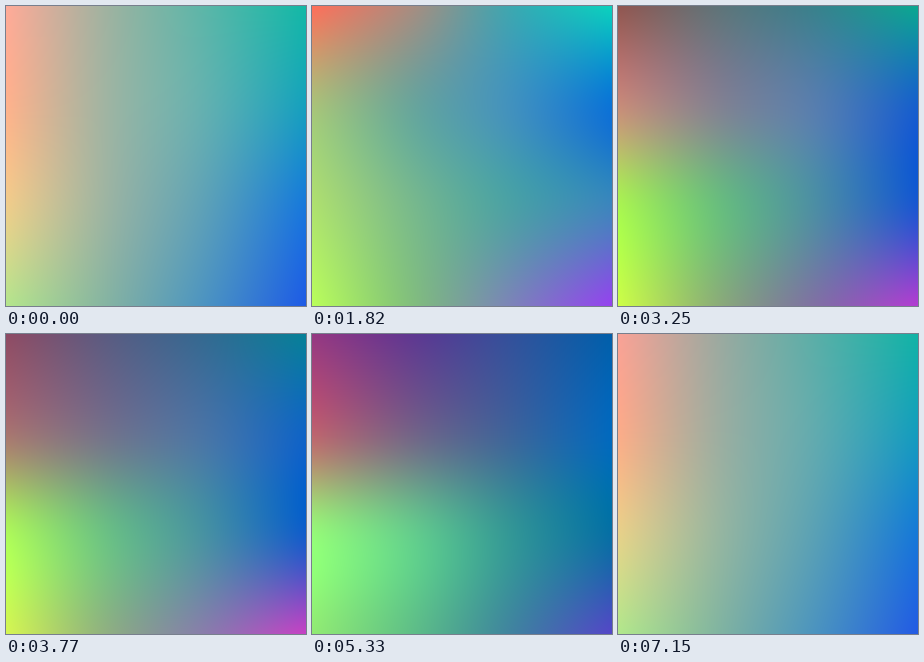
Animation, 300 px wide and 300 px high, one loop 7280 ms. Source, as an HTML page with a canvas:

```html
<!DOCTYPE html>
<html lang="en">
<head>
<meta charset="utf-8">
<title>Drifting colour mesh</title>
<style>
  html, body { margin: 0; width: 100%; height: 100%; overflow: hidden; }
  canvas { display: block; width: 100vw; height: 100vh; }
</style>
</head>
<body>
<canvas id="stage" width="300" height="300"></canvas>
<script>
const SIZE = 300, LOOP = 7280, STEP = 130;

// Each pose is a 4 x 4 mesh of colours spread evenly over the stage.
const poses = [
  { at: 0, mesh: [
    'ffaa98 a0b2a0 5ab6a8 12b9a6',
    'ffb28c a0b4a2 62b0b0 14a0be',
    'f0cd8a 9cb4a2 5ca0b8 1678dc',
    'b4e68c 84b4a2 4b92c2 1e5ae6'] },
  { at: 1820, mesh: [
    'ff6e5a a88c80 3ca8b0 0ad2be',
    'aac378 69a59b 4191be 0a73d7',
    'afe16e 78b98c 4ba0a5 3c84be',
    'b9ff5a 82be7d 7d82b9 9641f0'] },
  { at: 3250, mesh: [
    '915550 5f7378 37828c 0aa891',
    'c88c78 828291 557daf 145fcd',
    'aaf550 69be7d 4b8ca5 1955d2',
    'cdff46 8cac78 826ea5 b43cd2'] },
  { at: 4420, mesh: [
    '8c3c7d 553c8c 2d4b96 0050a0',
    '825a64 5f5f82 37699b 0569be',
    'b4ff64 6ec38c 4196a0 0564c3',
    'e1eb5f 96b48c 968cb4 e146b4'] },
  { at: 5330, mesh: [
    '963782 5f3791 32509b 005faa',
    'be646e 736487 3c649b 0069be',
    '96fa78 64cd8c 329696 056ea5',
    '91eb73 5fbe87 4182a0 5546c8'] },
  { at: 5850, mesh: [
    'c84b82 7d509b 4664a0 007da5',
    'e17369 876e8c 4173a5 0073c3',
    '96fa7d 64c88c 289ba0 0578af',
    '96ff82 5ab991 3c8caf 505ad2'] }
].map(({ at, mesh }) => ({
  at,
  mesh: mesh.map(row => row.split(' ').map(hex =>
    [0, 2, 4].map(i => parseInt(hex.slice(i, i + 2), 16))))
}));
poses.push({ at: LOOP, mesh: poses[0].mesh });

const mix = (a, b, k) => a + (b - a) * k;

function curve(p, u) {
  const i = Math.min(2, Math.floor(u * 3)), f = u * 3 - i;
  const a = p[i], b = p[i + 1];
  const before = i > 0 ? p[i - 1] : 2 * a - b;
  const after = i < 2 ? p[i + 2] : 2 * b - a;
  const m = (b - before) / 2, n = (after - a) / 2;
  return a + f * (m + f * (3 * (b - a) - 2 * m - n + f * (2 * (a - b) + m + n)));
}

function meshAt(time) {
  const next = poses.findIndex(p => p.at > time);
  const a = poses[next - 1], b = poses[next];
  const k = (time - a.at) / (b.at - a.at);
  return a.mesh.map((row, y) => row.map((colour, x) =>
    colour.map((v, c) => mix(v, b.mesh[y][x][c], k))));
}

const ctx = document.getElementById('stage').getContext('2d');
const image = ctx.createImageData(SIZE, SIZE);
image.data.fill(255);

function draw(time) {
  const mesh = meshAt(time);
  for (let y = 0; y < SIZE; y++) {
    const v = (y + 0.5) / SIZE;
    for (let c = 0; c < 3; c++) {
      const line = [0, 1, 2, 3].map(x => curve(mesh.map(row => row[x][c]), v));
      for (let x = 0; x < SIZE; x++) {
        image.data[(y * SIZE + x) * 4 + c] = curve(line, (x + 0.5) / SIZE);
      }
    }
  }
  ctx.putImageData(image, 0, 0);
}

let shown = -1;
function tick() {
  const time = Math.floor(performance.now() % LOOP / STEP) * STEP;
  if (time !== shown) draw(shown = time);
  requestAnimationFrame(tick);
}
tick();
</script>
</body>
</html>
```
